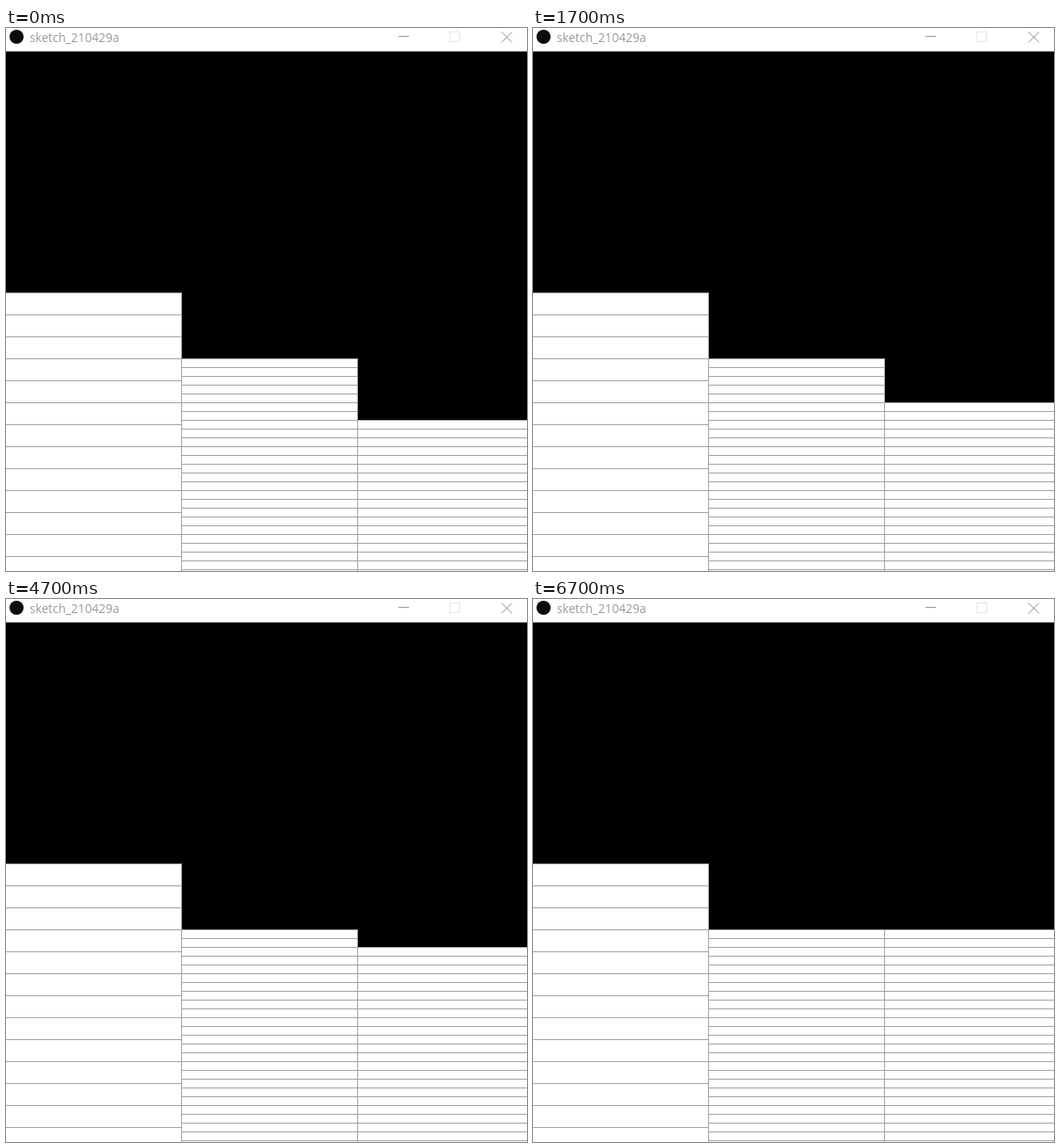
These frames come from a looping animation (592x618 px, 7.1 s). An HTML page:

```html
<!DOCTYPE html>
<html lang="en">
<head>
<meta charset="utf-8">
<title>Stacking bars</title>
<style>
  html, body { margin: 0; width: 100%; height: 100%; overflow: hidden; background: #000; }
  svg { display: block; width: 592px; height: 618px; }
  text { font: 13.7px "Open Sans", "Noto Sans", sans-serif; fill: #999; }
</style>
</head>
<body>
<svg viewBox="0 0 592 618">
  <rect width="592" height="618" fill="#000"/>
  <rect width="592" height="26" fill="#fff"/>
  <rect y="26" width="592" height="1" fill="#a0a0a0"/>
  <circle cx="12" cy="10" r="8" fill="#0c0c10"/>
  <text x="27" y="16">sketch_210429a</text>
  <g fill="none" stroke="#999">
    <path d="M446 9.5H458"/>
    <rect x="504.5" y="4.5" width="11" height="11" stroke="#e6e6e6"/>
    <path d="M563 4.5L575 16.5M575 4.5L563 16.5" stroke="#8a8a8a"/>
  </g>
  <g id="bars" stroke="#a0a0a0"></g>
</svg>
<script>
  const LOOP = 7100, HEIGHT = 618, FIRST_DROP = 700, DROP_EVERY = 1000;
  const NS = "http://www.w3.org/2000/svg";
  const bars = document.getElementById("bars");

  function add(name, attrs) {
    const el = document.createElementNS(NS, name);
    for (const key in attrs) el.setAttribute(key, attrs[key]);
    return bars.appendChild(el);
  }

  // A column of equal bricks that runs off the bottom of the stage.
  function makeColumn(left, right, brick) {
    const fill = add("rect", { x: left, width: right - left, fill: "#fff", stroke: "none" });
    const lines = add("path", { fill: "none" });
    return top => {
      fill.setAttribute("y", top);
      fill.setAttribute("height", HEIGHT - top);
      let d = `M${right - 0.5} ${top}V${HEIGHT}`;
      for (let y = top; y < HEIGHT; y += brick) d += `M${left} ${y + 0.5}H${right}`;
      lines.setAttribute("d", d);
    };
  }

  makeColumn(0, 200, 25)(301);
  makeColumn(200, 400, 10)(376);
  const setGrowing = makeColumn(400, 600, 10);

  function draw(time) {
    const t = time % LOOP;
    const added = t < FIRST_DROP ? 0 : 1 + Math.floor((t - FIRST_DROP) / DROP_EVERY);
    setGrowing(446 - 10 * added);
  }

  const start = performance.now();
  function tick() {
    draw(performance.now() - start);
    requestAnimationFrame(tick);
  }
  tick();
</script>
</body>
</html>
```
